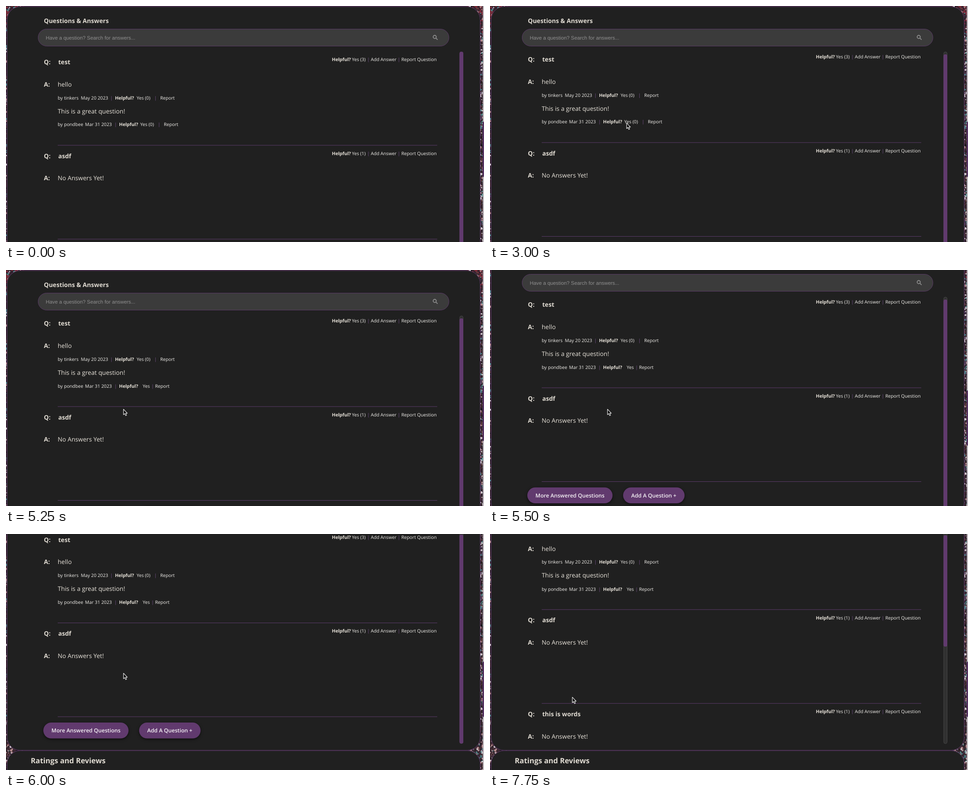
An HTML page with a canvas for the animation above (8 s loop, 1063x527 px).

```html
<!DOCTYPE html>
<html lang="en">
<head>
<meta charset="utf-8">
<title>Questions and answers</title>
<style>
  html, body { margin: 0; width: 100%; height: 100%; overflow: hidden; background: #202020; }
  #stage { position: relative; width: 1063px; height: 527px; overflow: hidden; background: #241a22; }
  #page, #page > *, #top { position: absolute; left: 0; top: 0; }
  text {
    font-family: "Open Sans", "Noto Sans", sans-serif; fill: #e8e3da;
    white-space: pre; text-rendering: geometricPrecision;
  }
  .body { font-size: 13.65px; }
  .bold { font-size: 13.65px; font-weight: 700; fill: #e0dbd2; }
  .meta { font-size: 10.24px; fill: #f2f0ec; }
  .help { font-size: 10.24px; font-weight: 700; }
  .bar { font-size: 10.24px; fill: #75518a; text-anchor: middle; }
  .title { font-size: 16.38px; font-weight: 700; fill: #e0dbd2; }
  .label { font-size: 12.08px; font-weight: 600; fill: #f6f3f6; }
  .hint { font: 11.37px "Liberation Sans", Arial, sans-serif; fill: #8f8f8f; }
  .card { fill: #202020; stroke: #5d3869; }
  .rule { stroke: #5c3b6b; }
  .pill { fill: #613a6e; filter: drop-shadow(0 2px 3px rgba(0, 0, 0, .6)); }
  .pill.hot { fill: #64b63c; }
  .pressed { fill: #a5a1a6; }
</style>
</head>
<body>
<div id="stage">
  <div id="page">
    <canvas id="sky" width="1063" height="720"></canvas>
    <svg width="1063" height="720">
      <clipPath id="view"><rect x="0" y="102" width="1063" height="472.5"/></clipPath>
      <rect class="card" x="2.5" y="1.5" width="1052" height="588" rx="29"/>
      <rect class="card" x="2.5" y="590.3" width="1052" height="300" rx="29"/>
      <text class="bold" x="84.3" y="38">Questions &amp; Answers</text>
      <text class="title" x="55" y="618">Ratings and Reviews</text>
      <rect x="71.5" y="51.5" width="913.5" height="38" rx="19" fill="#3b3b3b" stroke="#5a3a66"/>
      <text class="hint" x="88.5" y="75.3">Have a question? Search for answers...</text>
      <g fill="none" stroke="#8d8d8d" stroke-width="1.8">
        <circle cx="953.4" cy="69" r="3.5"/>
        <path d="M956 71.6L959.3 74.9" stroke-linecap="round"/>
      </g>
      <rect x="1009" y="102.5" width="7.5" height="472" rx="3.75" fill="#303030" stroke="#474747"/>
      <rect id="thumb" x="1008.5" width="8.5" rx="4" fill="#613a6e"/>
      <g clip-path="url(#view)"><g id="list"></g></g>
    </svg>
  </div>
  <svg id="top" width="1063" height="527">
    <rect x="1060.5" width="2.5" height="527" fill="#c9c5c9"/>
    <rect id="pageThumb" x="1060" y="258" width="8" height="124" rx="4" fill="#563563"/>
    <path id="cursor" d="M.8 .8V13.2L3.6 10.6L5.6 15.2L7.6 14.3L5.7 9.9H9.3Z"
      fill="#111" stroke="#f4f4f4" stroke-width="1.1" stroke-linejoin="round"/>
  </svg>
</div>
<script>
const LOOP = 8000, PITCH = 209.5, VIEW = 472.5, SHORT = 478.5;
const $ = id => document.getElementById(id);

function add(parent, tag, attrs, text) {
  const el = document.createElementNS("http://www.w3.org/2000/svg", tag);
  for (const key in attrs) el.setAttribute(key, attrs[key]);
  if (text) el.textContent = text;
  return parent.appendChild(el);
}
const group = parent => add(parent, "g", {});
const write = (parent, cls, x, y, text) => add(parent, "text", { class: cls, x, y }, text);
const move = (el, x, y) => el.setAttribute("transform", `translate(${x} ${y})`);
const show = (el, on) => el.setAttribute("visibility", on ? "visible" : "hidden");

function question(index, title, votes) {
  const g = group($("list"));
  move(g, 0, index * PITCH);
  write(g, "bold", 84.3, 130, "Q:");
  write(g, "bold", 116.2, 130, title);
  write(g, "help", 724.8, 123.3, "Helpful?");
  write(g, "meta", 769.3, 123.3, `Yes (${votes})`);
  write(g, "bar", 806, 123.3, "|");
  write(g, "meta", 811.2, 123.3, "Add Answer");
  write(g, "bar", 873.8, 123.3, "|");
  write(g, "meta", 879.2, 123.3, "Report Question");
  write(g, "bold", 84.3, 179.8, "A:");
  add(g, "path", { class: "rule", d: "M115 311H959" });
  return g;
}

function byline(g, y, name, date, dateX) {
  write(g, "meta", 115, y, "by " + name);
  write(g, "meta", dateX, y, date);
  write(g, "bar", dateX + 68, y, "|");
  write(g, "help", dateX + 75.8, y, "Helpful?");
}

function actions(g, y, x) {
  const yes = write(g, "meta", x, y, "Yes (0)");
  write(g, "bar", x + 41.7, y, "|");
  write(g, "meta", x + 52.4, y, "Report");
  return yes;
}

const first = question(0, "test", 3);
write(first, "body", 115, 179.8, "hello");
byline(first, 208.6, "tinkers", "May 20 2023", 166.6);
actions(first, 208.6, 290.5);
write(first, "body", 115, 239.5, "This is a great question!");
const answer = group(first);
byline(answer, 268.3, "pondbee", "Mar 31 2023", 175.8);
const before = group(answer), after = group(answer);
const yes = actions(before, 268.3, 298.5);
write(after, "meta", 304, 268.3, "Yes");
write(after, "bar", 326, 268.3, "|");
write(after, "meta", 331.4, 268.3, "Report");

const second = question(1, "asdf", 1), third = question(2, "this is words", 1);
for (const g of [second, third]) write(g, "body", 115, 179.8, "No Answers Yet!");

const buttons = group($("list"));
function button(x, width, text) {
  const pill = add(buttons, "rect", { class: "pill", x, y: 533.5, width, height: 35.6, rx: 17.8 });
  write(buttons, "label", x + 18, 555.9, text);
  return pill;
}
const more = button(83, 189.5, "More Answered Questions");
button(296, 136.7, "Add A Question +");

// speckled backdrop, visible at the sides and between the cards
function paintSky() {
  const c = $("sky").getContext("2d");
  const tones = ["#1a1419", "#2c1f2b", "#3f2a33", "#4a3a55", "#5a3a3c", "#4f8f90", "#b98f92", "#d8d0d6"];
  let seed = 7;
  const rnd = () => (seed = seed * 16807 % 2147483647) / 2147483647;
  c.fillStyle = "#33242d";
  c.fillRect(0, 0, 1063, 720);
  for (let i = 0; i < 6000; i++) {
    const x = rnd() * 80, y = rnd() * 720, r = .8 + rnd() * 1.8;
    c.fillStyle = y < 60 && rnd() < .5 ? "#7c2b3a" : tones[Math.floor(rnd() * tones.length)];
    c.beginPath();
    c.arc(x < 40 ? x : 983 + x, y, r, 0, 7);
    c.fill();
  }
}
paintSky();

// [start ms, values that hold until changed]
const steps = [
  [0, { at: null, page: 0, scroll: 0, bar: 0, press: false, voted: false, hot: false, long: false }],
  [500, { at: [503, 131] }],
  [750, { at: [339, 252.5] }],
  [1250, { scroll: 6, bar: 6 }],
  [2250, { at: [254, 273] }],
  [2500, { at: [266, 262] }],
  [2750, { at: [291, 260] }],
  [3000, { at: [303, 260.5] }],
  [3750, { at: [306, 260], press: true }],
  [4000, { at: [308, 260] }],
  [4250, { voted: true }],
  [5250, { at: [260.5, 310] }],
  [5500, { page: 42 }],
  [5750, { page: 80 }],
  [6000, { page: 106.5 }],
  [6250, { at: [222, 394] }],
  [6500, { at: [169, 469] }],
  [6750, { at: [170.5, 449], hot: true }],
  [7000, { long: true }],
  [7500, { at: [182.3, 363.5], scroll: 14, bar: 8 }],
  [7750, { scroll: 35.7, bar: 14 }]
];

function draw(t) {
  const s = {};
  for (const [start, values] of steps) if (t >= start) Object.assign(s, values);
  $("page").style.transform = `translateY(${-s.page}px)`;
  $("pageThumb").setAttribute("y", 258 + s.page * .25);
  move($("list"), 0, -s.scroll);

  const total = SHORT + (s.long ? 2 * PITCH : 0);
  $("thumb").setAttribute("y", 102 + s.bar * VIEW / total);
  $("thumb").setAttribute("height", VIEW * VIEW / total);

  show(third, s.long);
  show(before, !s.voted);
  show(after, s.voted);
  move(answer, 0, s.voted ? .6 : 0);
  yes.setAttribute("class", s.press ? "meta pressed" : "meta");
  more.setAttribute("class", s.hot ? "pill hot" : "pill");
  move(buttons, 0, s.long ? 2 * PITCH : 0);

  show($("cursor"), !!s.at);
  if (s.at) move($("cursor"), ...s.at);
}

const began = performance.now();
function tick() {
  draw((performance.now() - began) % LOOP);
  requestAnimationFrame(tick);
}
tick();
</script>
</body>
</html>
```
